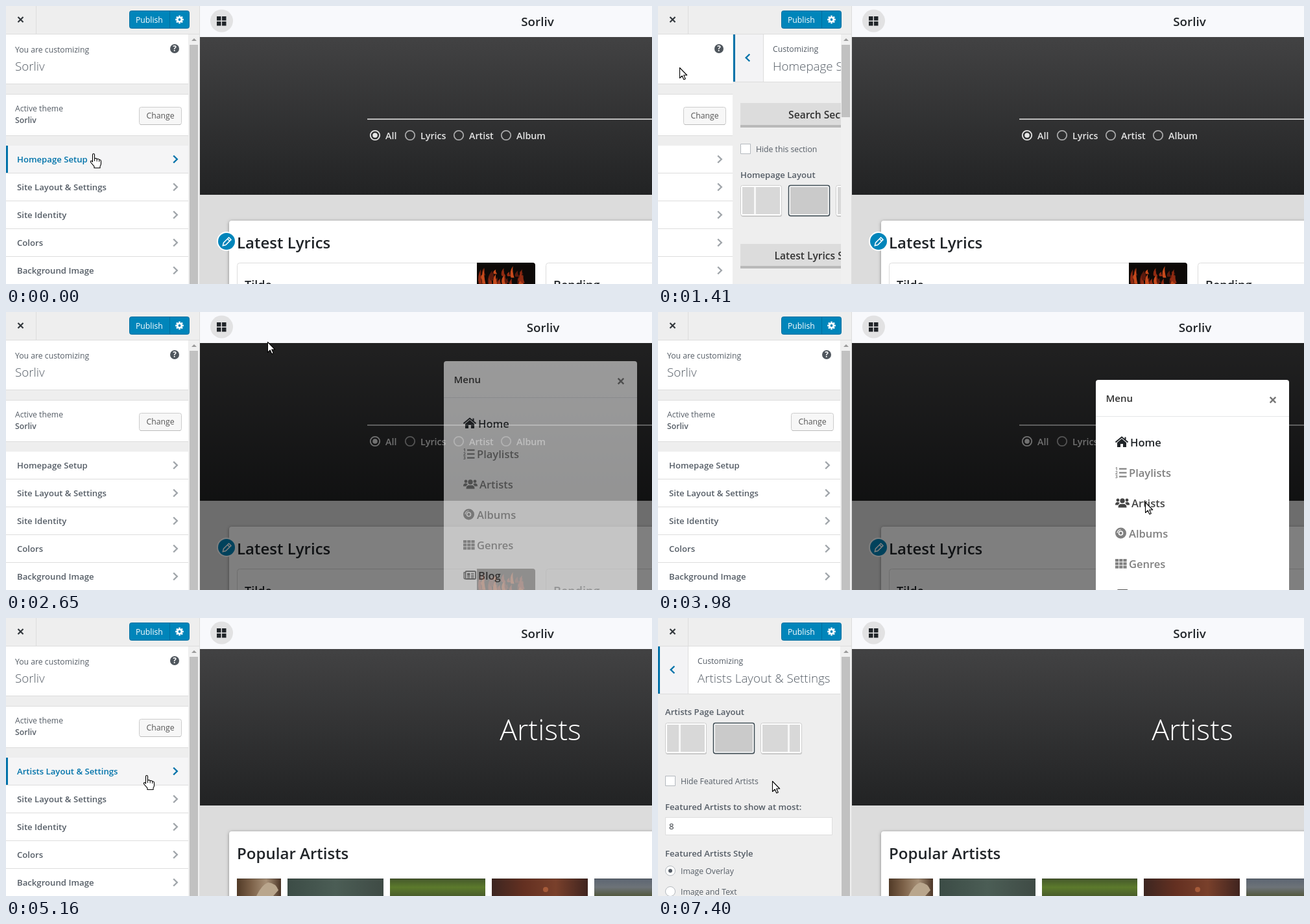
These frames come from a looping animation (996 by 430 pixels, 7.48 s). An HTML page with a canvas:

```html
<!DOCTYPE html>
<html lang="en">
<head>
<meta charset="utf-8">
<title>Theme customizer</title>
<style>
html, body { margin: 0; width: 996px; height: 430px; overflow: hidden; background: #eee; }
canvas { display: block; }
</style>
</head>
<body>
<canvas id="stage" width="996" height="430"></canvas>
<script>
const LOOP = 7480, TICK = LOOP / 96;
const BRAND = 'Sorliv', BLUE = '#0073aa', SIDE = 282;
const stage = document.getElementById('stage').getContext('2d');
const layerCanvas = document.createElement('canvas');
layerCanvas.width = 996;
layerCanvas.height = 430;
const layer = layerCanvas.getContext('2d');
let g = stage;

// Pointer path: time, x, y
const path = [
  [0, 135, 228], [340, 135, 228], [720, 62, 130], [1090, 33, 95], [1410, 33, 95],
  [1870, 259, 8], [2104, 335, 20], [2410, 335, 20], [2649, 403, 46], [2961, 661, 162],
  [3330, 767, 297], [3500, 751, 294], [4520, 751, 294], [5142, 217, 243], [5305, 92, 231],
  [5454, 16, 226], [5532, 30, 228], [5611, 30, 228], [5766, 57, 235], [5925, 57, 235],
  [6200, 125, 241], [6390, 195, 234], [6860, 195, 234], [7400, 176, 252], [LOOP, 176, 252]
];
const clickTicks = [2, 15, 29, 49, 84];

const clamp = v => Math.max(0, Math.min(1, v));
const ramp = (t, start, length) => clamp((t - start) / length);
const smooth = u => u * u * (3 - 2 * u);

function pointerAt(t) {
  const i = Math.max(1, path.findIndex(k => k[0] >= t));
  const [t0, x0, y0] = path[i - 1], [t1, x1, y1] = path[i];
  const u = ramp(t, t0, t1 - t0);
  return { x: Math.round(x0 + (x1 - x0) * u), y: Math.round(y0 + (y1 - y0) * u) };
}

function rect(x, y, w, h, color) {
  g.fillStyle = color;
  g.fillRect(x, y, w, h);
}
function box(x, y, w, h, r, fill, line, width = 1) {
  g.beginPath();
  g.roundRect(x, y, w, h, r);
  if (fill) { g.fillStyle = fill; g.fill(); }
  if (line) { g.strokeStyle = line; g.lineWidth = width; g.stroke(); }
}
function disc(x, y, r, fill, line, width = 1) {
  g.beginPath();
  g.arc(x, y, r, 0, 7);
  if (fill) { g.fillStyle = fill; g.fill(); }
  if (line) { g.strokeStyle = line; g.lineWidth = width; g.stroke(); }
}
function stroke(d, color, width) {
  g.strokeStyle = color;
  g.lineWidth = width;
  g.stroke(new Path2D(d));
}
function fill(d, color) {
  g.fillStyle = color;
  g.fill(new Path2D(d));
}
function at(x, y, draw) {
  g.save();
  g.translate(x, y);
  draw();
  g.restore();
}
function text(s, x, y, size, weight, color, align = 'left') {
  g.font = `${weight} ${size * 0.94}px "Open Sans", "Noto Sans", sans-serif`;
  g.textAlign = align;
  g.fillStyle = color;
  g.fillText(s, x, y);
}
function shade(x, y, w, h, colors, across = false) {
  const grad = across ? g.createLinearGradient(x, 0, x + w, 0) : g.createLinearGradient(0, y, 0, y + h);
  colors.forEach((c, i) => grad.addColorStop(i / (colors.length - 1), c));
  rect(x, y, w, h, grad);
}
const cross = (x, y, r, color, width) =>
  at(x, y, () => stroke(`M${-r} ${-r}L${r} ${r}M${r} ${-r}L${-r} ${r}`, color, width));
const chevron = (x, y, dir, color) =>
  at(x, y, () => stroke(`M${-2.8 * dir} -5.5L${2.8 * dir} 0L${-2.8 * dir} 5.5`, color, 2.4));

// Sidebar

function topBar() {
  rect(0, 0, 298, 43, '#eee');
  rect(0, 43, 298, 1, '#ddd');
  rect(46, 0, 1, 43, '#ddd');
  cross(22.5, 21, 4, '#32373c', 2.2);
  box(190.5, 7.5, 92, 27, 3, '#0085ba', '#006ea0');
  rect(252, 8, 1, 27, '#006ea0');
  text('Publish', 200, 26, 13, 400, '#fff');
  at(267.5, 21, () => {
    for (let i = 0; i < 8; i++) {
      g.rotate(Math.PI / 4);
      rect(-1.3, -6.3, 2.6, 4, '#fff');
    }
    disc(0, 0, 3.3, null, '#fff', 2.6);
  });
}

function scrollBar(thumbHeight) {
  rect(282, 44, 16, 386, '#f0f0f0');
  fill('M286 54L290 50L294 54Z', '#9a9a9a');
  rect(283, 60, 13, thumbHeight, '#c1c1c1');
  rect(298, 0, 1, 430, '#ddd');
}

function mainPanel(firstItem, hover) {
  rect(0, 44, SIDE, 386, '#eee');
  rect(0, 44, SIDE - 1, 77, '#fff');
  rect(0, 120, SIDE - 1, 1, '#ddd');
  text('You are customizing', 14, 72, 13, 400, '#555d66');
  text(BRAND, 14, 100, 20, 300, '#555d66');
  disc(260, 66, 7, '#4f565d');
  text('?', 260, 70.2, 12.5, 700, '#fff', 'center');
  rect(0, 136, SIDE - 1, 65, '#ddd');
  rect(0, 137, SIDE - 1, 63, '#fff');
  text('Active theme', 14, 163, 13, 400, '#555d66');
  text(BRAND, 14, 181, 13, 600, '#555d66');
  box(205.5, 156.5, 65, 27, 3, '#f7f7f7', '#ccc');
  rect(207, 183, 62, 1, '#bbb');
  text('Change', 238, 174, 13, 400, '#555', 'center');
  [firstItem, 'Site Layout & Settings', 'Site Identity', 'Colors', 'Background Image'].forEach((label, i) => {
    const y = 216 + 43 * i, active = hover && i === 0;
    rect(0, y, SIDE - 1, 42, active ? '#f5f5f6' : '#fff');
    rect(0, y + 42, SIDE - 1, 1, '#ddd');
    if (active) rect(0, y, 3, 42, BLUE);
    text(label, 17, y + 26, 14, 600, active ? BLUE : '#555d66');
    chevron(261, y + 21, 1, active ? BLUE : '#a0a5aa');
  });
}

function panelHeader(title) {
  rect(0, 44, SIDE, 386, '#eee');
  rect(0, 44, SIDE - 1, 73, '#fff');
  rect(0, 44, 46, 73, '#f3f3f5');
  rect(46, 44, 1, 73, '#ddd');
  rect(0, 117, SIDE - 1, 1, '#ddd');
  rect(0, 44, 3, 73, BLUE);
  chevron(22.5, 80, -1, BLUE);
  text('Customizing', 61, 71, 13, 400, '#555d66');
  text(title, 61, 100, 20, 300, '#555d66');
}

function layoutChoices(y) {
  [[11, 18], [85, 0], [158, 39]].forEach(([x, split], i) => {
    const chosen = i === 1;
    box(x + 1, y + 1, 63, 48, 3, '#c6c6c6');
    box(x + 0.5, y + 0.5, 63, 47, 3, '#fff', chosen ? '#3c4a52' : '#ccc', chosen ? 1.5 : 1);
    rect(x + 3, y + 3, 58, 42, chosen ? '#cacaca' : '#d8d8d8');
    if (split) rect(x + 3 + split, y + 3, 3, 42, '#f6f6f6');
  });
}

function checkRow(y, label) {
  box(11.5, y - 7.5, 15, 15, 0, '#fff', '#b4b9be');
  text(label, 35, y + 5, 13, 400, '#555d66');
}

function homePanel() {
  panelHeader('Homepage Setup');
  [['Search Section', 150], ['Latest Lyrics Section', 368]].forEach(([label, y]) => {
    rect(11, y, 258, 34, '#dcdcdc');
    rect(11, y + 34, 258, 4, '#b9b9b9');
    text(label, 140, y + 24, 16.6, 600, '#333', 'center');
  });
  checkRow(221, 'Hide this section');
  text('Homepage Layout', 11, 266, 14, 600, '#555d66');
  layoutChoices(277);
}

function artistsPanel() {
  panelHeader('Artists Layout & Settings');
  text('Artists Page Layout', 11, 150, 14, 600, '#555d66');
  layoutChoices(162);
  checkRow(252, 'Hide Featured Artists');
  text('Featured Artists to show at most:', 11, 297, 14, 600, '#555d66');
  box(11.5, 308.5, 257, 27, 0, '#fff', '#ddd');
  text('8', 17, 327, 14, 400, '#32373c');
  text('Featured Artists Style', 11, 369, 14, 600, '#555d66');
  ['Image Overlay', 'Image and Text'].forEach((label, i) => {
    const y = 391 + 32 * i;
    disc(19, y, 7.5, '#fff', '#b4b9be');
    if (!i) disc(19, y, 3, '#555d66');
    text(label, 35, y + 5, 13, 400, '#555d66');
  });
}

// Preview

function siteHeader(shift) {
  rect(299, 0, 697, 48, '#f8f9fc');
  disc(332.5, 23, 17.5, '#e2e2e3');
  for (let i = 0; i < 4; i++) rect(325 + 8 * (i % 2), 16 + 8 * (i >> 1), 6.5, 6.5, '#212529');
  text(BRAND, 819.5 + shift, 30.5, 20, 600, '#212529', 'center');
}

function pageBase(heroEnd) {
  rect(299, 48, 697, 382, '#dcdcdc');
  shade(299, 48, 697, heroEnd - 48, ['#424243', '#222324']);
  g.save();
  g.shadowColor = 'rgba(0,0,0,.4)';
  g.shadowBlur = 5;
  g.shadowOffsetY = 1;
  box(344, heroEnd + 40, 700, 200, 4, '#fff');
  g.restore();
}

function flames() {
  rect(726, 397, 90, 33, '#0d0907');
  let seed = 7;
  const rnd = () => (seed = seed * 16807 % 2147483647) / 2147483647;
  for (let i = 0; i < 34; i++) {
    const x = 729 + rnd() * 70, h = 4 + rnd() * 20, y = 401 + rnd() * 22;
    at(x, y, () => fill(`M0 ${h}Q-3 ${h / 2} 3 0Q2 ${h / 2} 5 ${h}Z`, ['#8f2a12', '#5b1a0d', '#c64a1c'][i % 3]));
  }
}

function homePage() {
  pageBase(292);
  rect(557, 174, 439, 2, '#bdbdbd');
  [['All', 569], ['Lyrics', 623], ['Artist', 698], ['Album', 771]].forEach(([label, x], i) => {
    disc(x, 200, 7.2, null, i ? '#a9a9aa' : '#e6e6e6', 1.8);
    if (!i) disc(x, 200, 3.8, '#e6e6e6');
    text(label, x + 16, 206, 15.2, 600, '#e4e4e4');
  });
  text('Latest Lyrics', 356, 375, 25.6, 600, '#212529');
  box(356.5, 397.5, 459, 60, 4, '#fff', '#ddd');
  box(832.5, 397.5, 459, 60, 4, '#fff', '#ddd');
  g.save();
  g.beginPath();
  g.roundRect(726, 397, 90, 60, [0, 4, 0, 0]);
  g.clip();
  flames();
  g.restore();
  text('Tilde', 368, 437.5, 19.2, 600, '#212529');
  text('Bending', 844, 437.5, 19.2, 600, '#212529');
  disc(340, 364, 15, '#fff');
  disc(340, 364, 13, '#0085ba');
  at(340, 365, () => {
    g.rotate(Math.PI / 4);
    stroke('M-2.4 -7.5H2.4V4L0 8L-2.4 4ZM-2.4 -4.5H2.4', '#fff', 1.5);
  });
}

function artistsPage() {
  pageBase(290);
  text('Artists', 824, 189, 47.5, 300, '#fff', 'center');
  text('Popular Artists', 356, 373, 25.6, 600, '#212529');
  shade(356, 403, 68, 27, ['#513a27', '#7d6249', '#a68f76', '#4b3526'], true);
  at(400, 417, () => fill('M-14 13Q-6 -4 4 -8Q16 -7 20 4L12 13Z', '#b9a68d'));
  shade(434, 403, 148, 27, ['#3c4c46', '#4b5d55', '#3f4b45'], true);
  shade(592, 403, 147, 27, ['#44572b', '#5c7a2c', '#4a5d2b']);
  shade(749, 403, 148, 27, ['#3d2621', '#643021', '#79402b', '#40241f'], true);
  disc(832, 420, 4, '#a65b39');
  shade(907, 403, 89, 27, ['#5c6572', '#6d7378', '#53583f']);
  rect(356, 403, 640, 1, 'rgba(0,0,0,.25)');
  rect(424, 403, 10, 27, '#fff');
  rect(582, 403, 10, 27, '#fff');
  rect(739, 403, 10, 27, '#fff');
  rect(897, 403, 10, 27, '#fff');
}

// Menu icons, each drawn around the middle of its left edge
const icons = {
  Home(c) {
    fill('M3 1L10 -5L17 1V8H12V3H8V8H3Z', c);
    stroke('M0.5 0.5L10 -7.5L19.5 0.5M15.5 -7.5V-3.5', c, 2);
  },
  Playlists(c) {
    for (let i = 0; i < 3; i++) {
      text(i + 1, 0, -3.2 + 6 * i, 7, 700, c);
      rect(6, -6.5 + 6 * i, 11.5, 2.2, c);
    }
  },
  Artists(c) {
    disc(4, -4, 2.4, c);
    disc(18, -4, 2.4, c);
    disc(11, -3, 3.7, c);
    fill('M0 3Q0 -1 4 -1L7 0Q5 2 4.5 3.5H0ZM22 3Q22 -1 18 -1L15 0Q17 2 17.5 3.5H22ZM4.5 7.5Q4.5 2 9 2H13Q17.5 2 17.5 7.5Z', c);
  },
  Albums(c) {
    disc(8.5, 0, 8.5, c);
    disc(8.5, 0, 3, null, '#fff', 1.6);
    stroke('M3 0A5.5 5.5 0 0 1 8.5 -5.5', '#fff', 1.2);
  },
  Genres(c) {
    for (let i = 0; i < 9; i++) rect(6.2 * (i % 3), -7 + 5.2 * Math.floor(i / 3), 5.2, 4.2, c);
  },
  Blog(c) {
    box(3.5, -6, 15.5, 12, 1.5, null, c, 2);
    stroke('M3 -4H1V4Q1 6 3.5 6M6 2H10.5M12 2H16.5M6 4.2H10.5M12 4.2H16.5M12 -2.5H16.5M12 -0.2H16.5', c, 1.3);
    rect(6, -3.3, 4.5, 4, c);
  }
};

function menu(top, pointer) {
  box(675, top, 298, 420, 4, '#fff');
  text('Menu', 690.5, top + 34, 16, 600, '#333');
  cross(948, top + 31, 4.3, '#777', 2.4);
  rect(675, top + 56, 298, 1, '#e4e6e8');
  const textX = [728, 726, 730, 726, 726, 728];
  Object.keys(icons).forEach((label, i) => {
    const y = top + 96 + 47 * i;
    const hover = pointer.x > 690 && pointer.x < 960 && Math.abs(pointer.y - y) < 22;
    const color = i === 0 ? '#212529' : hover ? '#444' : i === 5 ? '#555' : '#808080';
    at(705, y, () => icons[label](color));
    text(label, textX[i], y + 6.5, 17.6, 600, color);
  });
}

function preview(t, pointer) {
  if (t >= 4760) {
    artistsPage();
    siteHeader(0);
    return;
  }
  const dim = ramp(t, 2418, 150), show = ramp(t, 2567, 150);
  homePage();
  rect(299, 48, 697, 382, `rgba(0,0,0,${0.5 * dim})`);
  siteHeader(dim > 0 ? 8.5 : 0);
  if (show > 0) {
    const top = 105 - 50 * (1 - ramp(t, 2567, 300)) ** 1.7;
    g = layer;
    g.clearRect(0, 0, 996, 430);
    menu(Math.round(top), pointer);
    g = stage;
    g.globalAlpha = show;
    g.drawImage(layerCanvas, 0, 0);
    g.globalAlpha = 1;
  }
  rect(299, 0, 697, 430, `rgba(207,207,207,${0.75 * ramp(t, 3975, 385)})`);
}

// Pointer

const arrow = 'M.5 .5V16.5L4.2 13L6.8 18.8L9.3 17.7L6.7 12H11.7Z';
const hand = 'M-1.5 13V2Q-1.5 .5 0 .5T1.5 2V8Q4.5 7 5.2 8.8Q8 8 8.7 9.8Q11.3 9.3 11.5 12V16Q11.5 18 10 20V22.5H1V20.2L-4.6 13.5Q-4.8 10.5 -2.5 12Z';

function drawPointer({ x, y }, isHand, pressed) {
  if (pressed) disc(x, y, 12, 'rgba(255,255,0,.47)');
  at(x, y, () => {
    const shape = isHand ? hand : arrow;
    g.lineJoin = 'round';
    fill(shape, '#fff');
    stroke(shape, '#000', 1.1);
    if (isHand) stroke('M1.5 8V12M5.2 9V12.5M8.7 10V13', '#000', 1);
    g.lineJoin = 'miter';
  });
}

function render(now) {
  const n = Math.floor((now % LOOP + 12) / TICK) % 96, t = n * TICK;
  const pointer = pointerAt(t);
  const onHome = t < 4000;
  const slide = onHome
    ? smooth(ramp(t, 340, 180)) - smooth(ramp(t, 1323, 180))
    : smooth(ramp(t, 6740, 180));
  const edge = SIDE - Math.round(SIDE * slide);
  const hover = pointer.x < edge && pointer.y >= 216 && pointer.y < 258;
  const onBack = slide === 1 && pointer.x < 46 && pointer.y > 44 && pointer.y < 117;
  const onGrid = Math.hypot(pointer.x - 332.5, pointer.y - 23) < 17.5;
  const onGear = pointer.x > 190 && pointer.x < 283 && pointer.y > 6 && pointer.y < 35;

  preview(t, pointer);
  g.save();
  g.beginPath();
  g.rect(0, 44, SIDE, 386);
  g.clip();
  at(edge - SIDE, 0, () => mainPanel(t >= 4760 ? 'Artists Layout & Settings' : 'Homepage Setup', hover));
  if (slide > 0) at(edge, 0, onHome ? homePanel : artistsPanel);
  g.restore();
  scrollBar(onHome && slide > 0 ? 112 : 370);
  topBar();
  drawPointer(pointer, hover || onBack || onGrid || onGear, clickTicks.includes(n));
}

const began = performance.now();
function loop() {
  render(performance.now() - began);
  requestAnimationFrame(loop);
}
loop();
</script>
</body>
</html>
```
